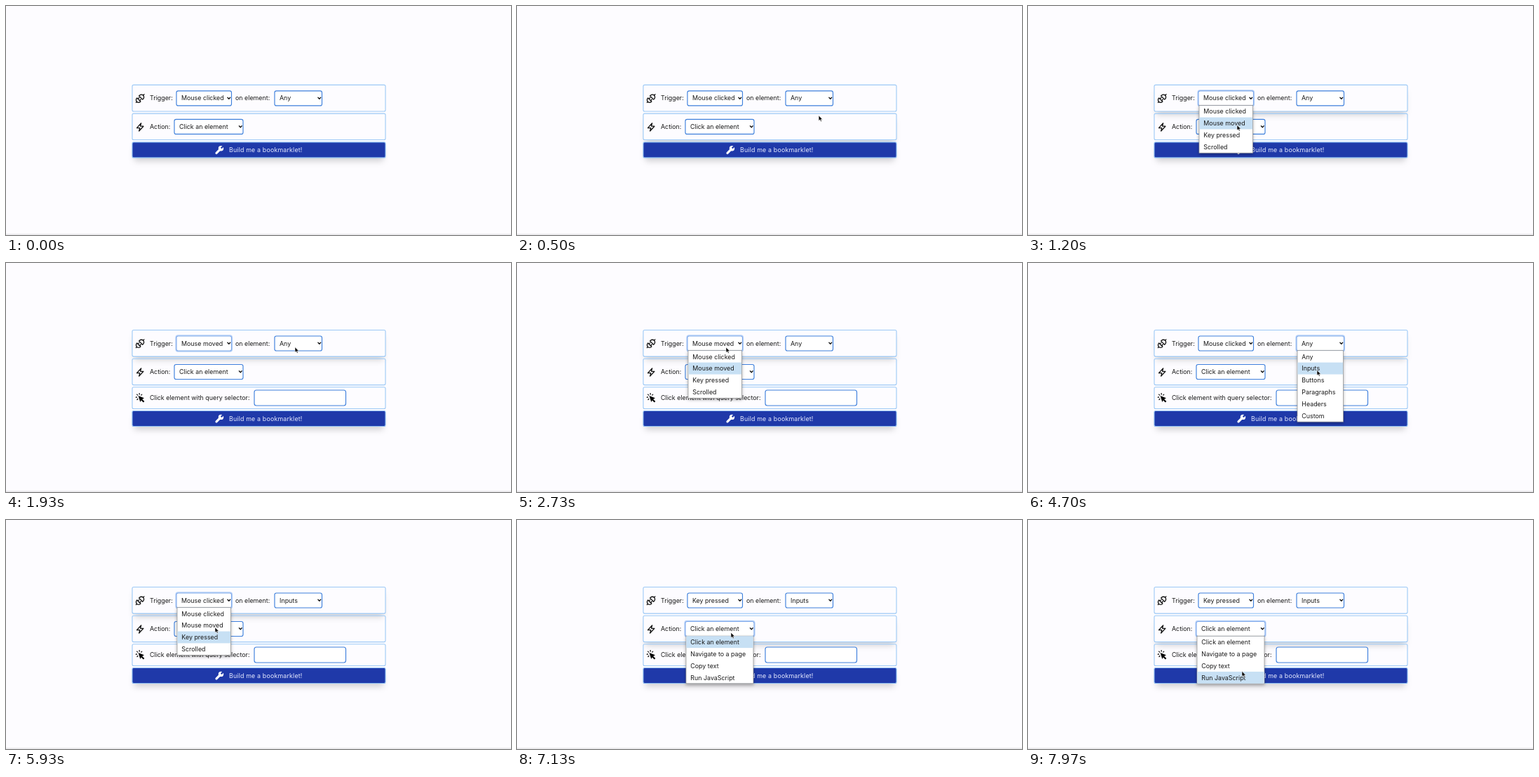
Animation, 720 px wide and 326 px high, one loop 8000 ms. Source, as an HTML page:

```html
<!DOCTYPE html>
<html lang="en">
<head>
<meta charset="utf-8">
<title>Bookmarklet builder</title>
<style>
  html, body { margin: 0; width: 100%; height: 100%; overflow: hidden; background: #fdfcff; }
  svg { display: block; width: 100vw; height: 100vh; }
  text { font: 8.9px Inter, "Open Sans", sans-serif; fill: #1a1a1a; }
  .row { fill: none; stroke: #9cc9f6; stroke-width: 1.1; }
  .field { fill: #fff; stroke: #3f80dc; stroke-width: 1.15; }
  .focused { stroke: #7fa9ea; }
  .ring { fill: none; stroke: #b9d3f8; stroke-width: 1.5; }
  .line { fill: none; stroke: #111; stroke-width: 1.3; stroke-linecap: round; stroke-linejoin: round; }
  .page { fill: #fdfcff; }
  .button { fill: #1f39a9; stroke: #8dbdf2; stroke-width: 1.1; }
  .button-text { fill: #e6eaff; letter-spacing: .15px; }
  .menu { fill: #fff; stroke: #888; stroke-width: .7; }
  .highlight { fill: #c7e0f4; }
  .cursor { fill: #000; stroke: #fff; stroke-width: .6; }
</style>
</head>
<body>
<svg viewBox="0 0 720 326">
  <defs>
    <filter id="shadow" x="-10%" y="-80%" width="120%" height="300%">
      <feDropShadow dx="0" dy="7" stdDeviation="4.5" flood-color="#000" flood-opacity=".17"/>
    </filter>
    <filter id="menuShadow" x="-20%" y="-20%" width="140%" height="150%">
      <feDropShadow dx="0" dy="2" stdDeviation="2" flood-color="#000" flood-opacity=".3"/>
    </filter>
  </defs>
  <rect width="720" height="326" class="page"/>
  <path d="M0 325H720" stroke="#dcdcdf"/>
  <g id="scene"></g>
  <path id="cursor" class="cursor" d="M0 0V7.6L1.8 6L3 8.6L4.3 8.1L3.2 5.6H5.5Z"/>
</svg>
<script>
const LOOP = 8000, ENTER = 30;
const ITEM = 16.9, ABOVE_MENU = -.3, IN_ITEM = .65;
const LEAD = 40; // the highlight runs slightly ahead of the drawn pointer
const scene = document.getElementById('scene');
const cursor = document.getElementById('cursor');

// Positions are measured from the top of the form.
const selects = [
  { x: 243, y: 8.5, w: 78.5, aim: 55, row: 0, options: ['Mouse clicked', 'Mouse moved', 'Key pressed', 'Scrolled'] },
  { x: 383, y: 8.5, w: 67.5, aim: 29, row: 0, options: ['Any', 'Inputs', 'Buttons', 'Paragraphs', 'Headers', 'Custom'] },
  { x: 240, y: 49, w: 98, aim: 65, row: 1, options: ['Click an element', 'Navigate to a page', 'Copy text', 'Run JavaScript'] }
];

// The pointer opens a menu, sweeps to the far item and comes back to pick one.
const visits = [
  { select: 0, open: 970, close: 1400, far: 1, pick: 1 },
  { select: 1, open: 1950, close: 2570, far: 2, pick: 0 },
  { select: 0, open: 2720, close: 3400, far: 3, pick: 0 },
  { select: 1, open: 3720, close: 5100, far: 5, pick: 1 },
  { select: 0, open: 5810, close: 6250, far: 2, pick: 2 },
  { select: 2, open: 6800, pause: 330, close: 9670, far: 3, pick: 3 }
];

const mix = (a, b, k) => a + (b - a) * k;
const ease = (t, from, to) => {
  const k = Math.min(1, Math.max(0, (t - from) / (to - from)));
  return k * k * (3 - 2 * k);
};
const formTop = t => t < visits[0].close ? 112.4 : 95.5;
const menuTop = s => s.y + 20.7;

// Pointer height within the menu, counted in items.
function menuDepth(visit, t) {
  const start = visit.open + (visit.pause || 0), span = visit.close - start;
  const [far, goal] = [visit.far + IN_ITEM, visit.pick + IN_ITEM];
  const down = mix(ABOVE_MENU, far, ease(t, start, start + span * .45));
  return down + (goal - far) * ease(t, start + span * .45, start + span * .7);
}

function pointerIn(visit, t) {
  const s = selects[visit.select];
  return [s.x + s.aim, formTop(t) + menuTop(s) + menuDepth(visit, t) * ITEM];
}

function pointerAt(t) {
  const i = visits.findIndex(v => t < v.close), visit = visits[i], last = visits[i - 1];
  if (t >= visit.open) return pointerIn(visit, t);
  const leave = last ? last.close : ENTER;
  const from = last ? pointerIn(last, last.close - 1) : [718, 198];
  const to = pointerIn(visit, visit.open);
  const k = ease(t, leave, mix(leave, visit.open, .8));
  return from.map((a, axis) => mix(a, to[axis], k));
}

function stateAt(t) {
  const picked = [0, 0, 0];
  let open = -1, focus = -1, highlight = 0;
  for (const v of visits.filter(v => t >= v.open)) {
    focus = v.select;
    if (t >= v.close) {
      picked[v.select] = v.pick;
    } else {
      open = v.select;
      const item = Math.floor(menuDepth(v, t + LEAD));
      highlight = item < 0 ? picked[open] : item;
    }
  }
  return { picked, open, focus, highlight, expanded: t >= visits[0].close };
}

const text = (x, y, label, cls = '') => `<text x="${x}" y="${y}" class="${cls}">${label}</text>`;
const box = (x, y, w, h, r, cls, extra = '') =>
  `<rect x="${x}" y="${y}" width="${w}" height="${h}" rx="${r}" class="${cls}" ${extra}/>`;
const icon = (x, y, body) => `<g transform="translate(${x} ${y})">${body}</g>`;
const raised = (y, h) =>
  box(183, y + 2, 355, h - 4, 2, 'page', 'filter="url(#shadow)"') + box(180, y, 361, h, 2, 'page');

const plug = `<g class="line" transform="rotate(-45)">
  <path d="M1.4-3.6V3.6H2.6a3.6 3.6 0 0 0 0-7.2ZM6.2 0H8.2M-2.6-3.6V3.6H-3a3.6 3.6 0 0 1 0-7.2ZM-6.6 0H-8.2M-2.6-1.7H-.2M-2.6 1.7H-.2"/></g>`;
const bolt = '<path class="line" d="M1.5-5.6L-4.7 1.2H-.4L-1.5 5.6L4.7-1.2H.4Z"/>';
const rays = [-50, -5, 45, 90, 135]
  .map(a => `<path class="line" d="M-3.6 0H-5" transform="rotate(${a})"/>`).join('');
const click = `<path d="M-2.4-2.4L6 .8L3.2 2.4L6.4 5.6L4.9 7L1.7 3.9L.4 6.6Z"/>
  <g transform="translate(-.8 -.8)">${rays}</g>`;
const wrench = `<path d="M-4.2 4.2L1 -1" stroke="#fff" stroke-width="3.2" stroke-linecap="round"/>
  <circle cx="2.3" cy="-2.3" r="3.7" fill="#fff"/>
  <path d="M2.6-2.6L5.6-5.6" stroke="#1f39a9" stroke-width="2.4"/>`;

function drawSelect(s, i, top, state) {
  const y = top + s.y, mid = y + 10.3, focused = state.focus === i;
  return (focused ? box(s.x - .9, y - .9, s.w + 1.8, 22.8, 3.2, 'ring') : '') +
    box(s.x, y, s.w, 21, 2.5, focused ? 'field focused' : 'field') +
    text(s.x + 7, mid + 3.2, s.options[state.picked[i]]) +
    `<path class="line" d="M${s.x + s.w - 5.6} ${mid - 1}l1.9 2l1.9-2"/>`;
}

function drawMenu(s, top, highlight) {
  const x = s.x + 1, y = top + menuTop(s), w = s.w - 2;
  return box(x, y, w, s.options.length * ITEM, 0, 'menu', 'filter="url(#menuShadow)"') +
    box(x + .4, y + highlight * ITEM, w - .8, ITEM, 0, 'highlight') +
    s.options.map((o, i) => text(s.x + 7.3, y + i * ITEM + 11.8, o)).join('');
}

function drawScene(state, top, rows, hovered) {
  const buttonY = top + (state.expanded ? 115 : 81.5);
  const hover = rows[hovered];
  return raised(buttonY, 22) +
    (hover ? raised(top + hover[0], hover[1]) : '') +
    rows.map(([y, h]) => box(180, top + y, 361, h, 2, 'row')).join('') +
    icon(191.2, top + 19.2, plug) + text(205, top + 22, 'Trigger:') + text(327, top + 22, 'on element:') +
    icon(191.2, top + 60, bolt) + text(205, top + 62.7, 'Action:') +
    (state.expanded
      ? icon(191, top + 96, click) + text(205, top + 99.6, 'Click element with query selector:') +
        box(354, top + 85.5, 130.5, 22, 3, 'field')
      : '') +
    box(180, buttonY, 361, 22, 2, 'button') +
    icon(304.2, buttonY + 11.2, wrench) +
    text(318, buttonY + 14.2, 'Build me a bookmarklet!', 'button-text') +
    selects.map((s, i) => drawSelect(s, i, top, state)).join('') +
    (state.open < 0 ? '' : drawMenu(selects[state.open], top, state.highlight));
}

let lastKey;
function render(t) {
  const state = stateAt(t), [x, y] = pointerAt(t), top = formTop(t);
  const rows = [[0, 37.6], [40.7, 37.4]];
  if (state.expanded) rows.push([81.3, 30.7]);
  const inside = x > 180 && x < 541;
  const hovered = state.open >= 0
    ? selects[state.open].row
    : rows.findIndex(([ry, h]) => inside && y >= top + ry && y <= top + ry + h);

  const key = JSON.stringify([state, hovered]);
  if (key !== lastKey) {
    scene.innerHTML = drawScene(state, top, rows, hovered);
    lastKey = key;
  }
  cursor.setAttribute('visibility', t < ENTER ? 'hidden' : 'visible');
  cursor.setAttribute('transform', `translate(${x} ${y})`);
}

const start = performance.now();
function tick() {
  render((performance.now() - start) % LOOP);
  requestAnimationFrame(tick);
}
tick();
</script>
</body>
</html>
```
